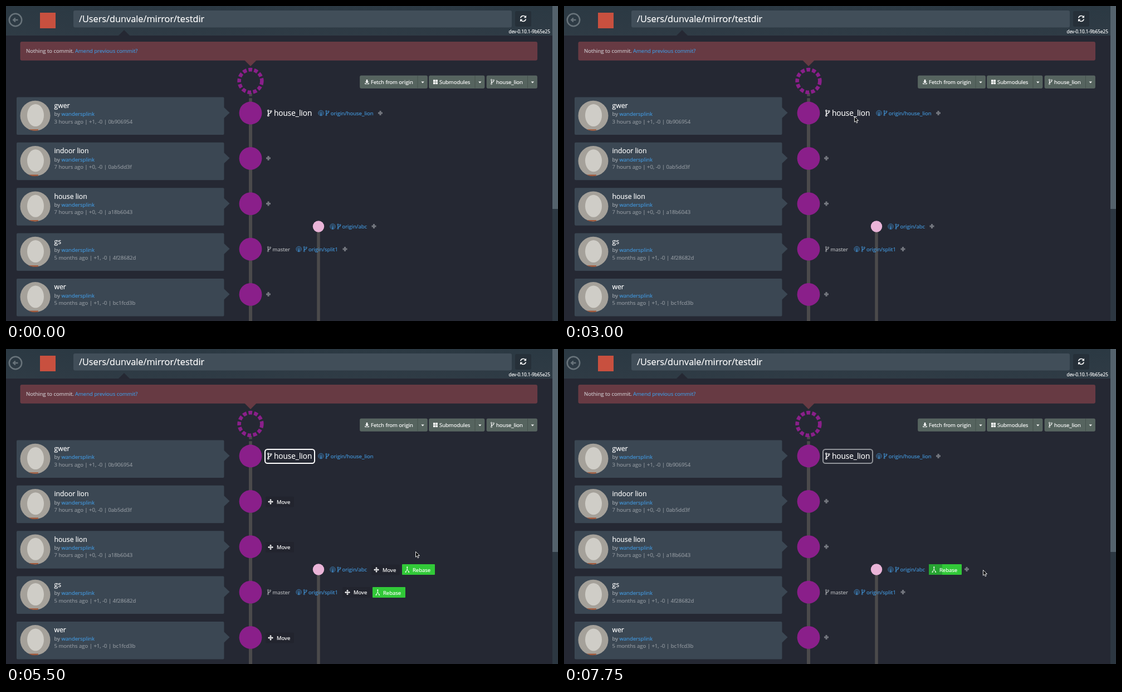
An HTML page that plays this animation: 991x565 px, repeating every 8 s.

```html
<!DOCTYPE html>
<html>
<head>
<meta charset="utf-8">
<style>
html, body { margin: 0; width: 100%; height: 100%; overflow: hidden; background: #252833; }
svg { display: block; width: 991px; height: 565px; font: 9.5px "Open Sans", sans-serif; }
text { stroke-width: .2px; }
</style>
</head>
<body>
<svg id="stage" viewBox="0 0 991 565"></svg>
<script>
const BLUE = '#4295d8', PURPLE = '#8a1f8a', CARD = '#3b4753', STEP = 81.35, LINE = '#4b4a4b';

const rect = (x, y, w, h, fill, r = 0, more = '') =>
  `<rect x="${x}" y="${y}" width="${w}" height="${h}" rx="${r}" fill="${fill}" ${more}/>`;
const circle = (x, y, r, fill, more = '') => `<circle cx="${x}" cy="${y}" r="${r}" fill="${fill}" ${more}/>`;
const text = (x, y, s, fill = '#fff', size = 9.5) =>
  `<text x="${x}" y="${y}" fill="${fill}" stroke="${fill}" font-size="${size}">${s}</text>`;
const path = (d, fill, more = '') => `<path d="${d}" fill="${fill}" ${more}/>`;
const at = (x, y, body, scale = 1) => `<g transform="translate(${x} ${y}) scale(${scale})">${body}</g>`;
const group = (id, body) => `<g id="${id}">${body}</g>`;
const stroke = (color, w) => `stroke="${color}" stroke-width="${w}"`;

// Icons, centred on x, y
const branch = (x, y, color, scale = 1) => at(x, y,
  path('M-2 -2.5V2.5M2 -1.5C2 1 -2 0 -2 2.5', 'none', stroke(color, 1.2)) +
  [[-2, -3.5], [2, -2.7], [-2, 3.6]].map(([a, b]) => circle(a, b, 1.1, 'none', stroke(color, .9))).join(''), scale);
const remote = (x, y) => at(x, y,
  circle(0, 0, 4.7, 'none', stroke(BLUE, .75)) + circle(0, 0, 2.7, 'none', stroke(BLUE, .6)) +
  circle(0, -.3, 1, BLUE) + path('M-1 1.2H1L.6 5H-.6Z', BLUE));
const plus = (x, y) => path(`M${x - 4} ${y}h8M${x} ${y - 4}v8`, 'none', stroke('#73767e', 3));
const arrows = (x, y) => at(x, y,
  path('M-3 0H3M0 -3V3', 'none', stroke('#fff', 1.3)) +
  [0, 90, 180, 270].map(a => path('M0 -5L2 -2.4H-2Z', '#fff', `transform="rotate(${a})"`)).join(''));
const caret = x => path(`M${x - 2.7} 135.5h5.4l-2.7 3z`, '#fff');

const move = (x, y) =>
  rect(x - 9, y - 9.5, 51, 19, '#20222c', 2, 'opacity=".6"') + arrows(x, y) + text(x + 11, y + 3.8, 'Move');
const rebase = (x, y, progress = 0) =>
  rect(x, y, 59, 19, '#31c938', 1) + rect(x, y, progress, 19, '#27a432', 1) +
  path(`M${x + 6.5} ${y + 14}L${x + 9.3} ${y + 9}L${x + 12.1} ${y + 14}M${x + 9.3} ${y + 9}V${y + 6}`, 'none', stroke('#fff', 1)) +
  circle(x + 9.3, y + 5.4, 1.1, '#fff') + circle(x + 6.5, y + 14, 1, '#fff') + circle(x + 12.1, y + 14, 1, '#fff') +
  text(x + 19, y + 13.5, 'Rebase');

// Everything dashed shares one rhythm
const DASH = 'stroke-dasharray="6.78 3.39"';
const ring = (x, y, r, color, w) => circle(x, y, r, 'none', `${stroke(color, w)} ${DASH}`);
const dashes = (x, y1, y2) => path(`M${x} ${y2}V${y1}`, 'none', `${stroke(LINE, 5.5)} ${DASH}`);

function header() {
  return rect(0, 0, 981, 53, 'url(#bar)') + path('M202 53l10 -10 10 10z', '#252833') +
    circle(17, 25, 11.2, 'none', stroke('#69747b', 2.5)) +
    path('M21.5 25H13.5M16.8 21.5L13.2 25l3.6 3.5', 'none', stroke('#69747b', 2.3)) +
    rect(61, 12, 28, 28, '#c8503f') +
    rect(121, 8, 787, 30.5, '#414e59', 3) +
    text(131, 29, '/Users/dunvale/mirror/testdir', '#fff', 16.27) +
    rect(914, 9, 29, 28, '#263039', 3) +
    path('M923.7 21.5a5 5 0 0 1 8.6 -2.3M933.3 23.5a5 5 0 0 1 -8.6 2.3', 'none', stroke('#fff', 1.5)) +
    path('M934 16.7v4.5h-4.5zM923 28.3v-4.5h4.5z', '#fff') +
    text(902.5, 48.5, 'dev-0.10.1-9b65e25', '#fff', 8.14) +
    rect(981, 0, 10, 565, '#2c3741') + rect(981, 0, 10, 364, '#54626c');
}

function notice() {
  return rect(26, 64.5, 927.5, 32.7, '#673a43', 2, stroke('#783f49', .7)) +
    path('M428 97h22l-11 11z', '#673a43') +
    text(36, 84, 'Nothing to commit.', '#c9c3c8') + text(124, 84, 'Amend previous commit?', BLUE);
}

function button(x, split, end, label, labelX) {
  return rect(x, 125, end - x, 22.5, '#56645f', 2, stroke('#606d69', .6)) +
    path(`M${split} 125v22.5`, 'none', stroke('#46524f', 1)) +
    text(labelX, 139.5, label) + caret((split + end) / 2 + .3);
}

function buttons() {
  return button(635.5, 739, 756.5, 'Fetch from origin', 655) +
    path('M646.7 132h2.6v3.5h2l-3.3 3.2-3.3-3.2h2zM644.3 138h1l1 1.5h3.4l1-1.5h1v2.3h-7.4z', '#fff') +
    button(759.5, 842, 859, 'Submodules', 778) +
    [0, 4.3].map(a => [0, 4.3].map(b => rect(767 + a, 132.3 + b, 3.6, 3.6, '#fff')).join('')).join('') +
    button(863, 936.5, 953.5, 'house_lion', 880) + branch(873.5, 136, '#fff');
}

const commits = [
  ['gwer', '3 hours ago | +1, -0 | 0b906954'],
  ['indoor lion', '7 hours ago | +0, -0 | 0ab5dd3f'],
  ['house lion', '7 hours ago | +0, -0 | a18b6043'],
  ['gs', '5 months ago | +1, -0 | 4f28682d'],
  ['wer', '5 months ago | +1, -0 | bc1fcd3b']
];

const card = ([title, meta], i) => at(0, i * STEP,
  rect(19, 163.5, 372.5, 67.5, CARD, 2) + path('M391 181.5l10.5 10-10.5 10z', CARD) +
  circle(52.5, 196.7, 27, '#a5a19a') +
  path('M40 221.2h18v1.9a27 27 0 0 1 -18 -2z', '#a0583a') +
  `<ellipse cx="53" cy="196" rx="15" ry="20" fill="#cfcdc7"/>` +
  text(86.5, 183, title, '#fff', 12.2) +
  text(86.5, 197.3, `by <tspan fill="${BLUE}" stroke="${BLUE}">wandersplink</tspan>`, '#9fa6ad') +
  text(86.5, 210.7, meta, '#8f969d') +
  circle(439, 192, 20.4, PURPLE));

function graph() {
  return path('M439 192V565', 'none', stroke(LINE, 6)) + path('M561 396V565', 'none', stroke(LINE, 5.5)) +
    dashes(439, 156, 172) + ring(439, 134.5, 20.35, PURPLE, 6.6) +
    commits.map(card).join('') + circle(561, 395.5, 10.2, '#eab4d8');
}

function preview() {
  let body = '';
  for (let y = 91; y < 340; y += 61)
    body += dashes(561, y + 22, y + 61 - (y > 330 ? 10 : 22)) + ring(561, y, 19, '#41de3c', 5.4);
  return `<g clip-path="url(#top)">${body}</g>`;
}

function labels() {
  return rect(465, 180, 89, 25, '#252833', 4.5, `id="focus" ${stroke('#fff', 2)}`) +
    branch(473.3, 192, '#fff', 1.2) + text(481, 196.5, 'house_lion', '#fff', 13.56) +
    remote(565.5, 192) + branch(577, 192, BLUE) + text(582.7, 195.5, 'origin/house_lion', BLUE) +
    remote(586.5, 395.5) + branch(598, 395.5, BLUE) + text(603.5, 399, 'origin/abc', BLUE) +
    branch(472.5, 436, '#b5b7bb') + text(478.6, 439.7, 'master', '#b5b7bb') +
    remote(525.7, 436) + branch(537.3, 436, BLUE) + text(543, 439.7, 'origin/split1', BLUE);
}

const pluses = [[672, 192], [471, 273], [471, 354.5], [608.5, 436], [471, 517]];
const moves = [[475, 274], [475, 355.5], [665, 396], [613, 436.5], [475, 518]];

document.getElementById('stage').innerHTML =
  `<defs><linearGradient id="bar" x2="0" y2="1"><stop stop-color="#2b3943"/><stop offset="1" stop-color="#2f3b45"/></linearGradient>
   <clipPath id="top">${rect(530, 110.5, 70, 300, '#000')}</clipPath></defs>` +
  header() + notice() + graph() + group('preview', preview()) + buttons() +
  group('hover', rect(863, 125, 73, 22.5, '#fff', 2, 'opacity=".12"')) + labels() +
  group('idle', pluses.map(p => plus(...p)).join('')) + group('abcPlus', plus(660.5, 395)) +
  group('actions', moves.map(p => move(...p)).join('') + rebase(658, 427)) +
  group('rebase', rebase(711, 386)) +
  group('running', rebase(655, 386, 24) + plus(723, 395)) +
  group('cursor', path('M.5 .5V10.2L2.7 8.1 4.3 11.8 6 11 4.4 7.5H7.5Z', '#000', stroke('#fff', .9)));

const el = id => document.getElementById(id);
const show = (id, on) => el(id).style.display = on ? '' : 'none';

// time, x, y: the pointer jumps at each time
const pointer = [
  [750, 910, 145], [1250, 672, 254], [1500, 662, 284], [1750, 655, 302], [2000, 637, 407],
  [2250, 599, 365], [2500, 556, 257], [2750, 527, 207], [3000, 521, 198], [3500, 518, 198],
  [3750, 517, 197], [4000, 516, 196], [5250, 579, 250], [5500, 735, 363], [5750, 745, 388],
  [6000, 752, 394], [6750, 752, 396]
];

function draw(t) {
  const pos = pointer.filter(p => p[0] <= t).pop();
  show('cursor', pos);
  if (pos) el('cursor').setAttribute('transform', `translate(${pos[1]} ${pos[2]})`);
  const choosing = t >= 4750 && t < 7750;
  show('hover', t >= 750 && t < 1250);
  show('idle', !choosing);
  show('abcPlus', t < 4750);
  show('actions', choosing);
  show('rebase', choosing);
  show('preview', t >= 5750 && t < 7750);
  show('running', t >= 7750);
  show('focus', t >= 4750);
  el('focus').setAttribute('stroke', t < 5000 ? '#60636b' : t < 7750 ? '#fff' : '#91949a');
  el('actions').style.opacity = t < 5750 ? 1 : t < 6000 ? .92 : t < 6250 ? .75 : .6;
}

function frame(now) {
  draw(now % 8000);
  requestAnimationFrame(frame);
}
draw(0);
requestAnimationFrame(frame);
</script>
</body>
</html>
```
